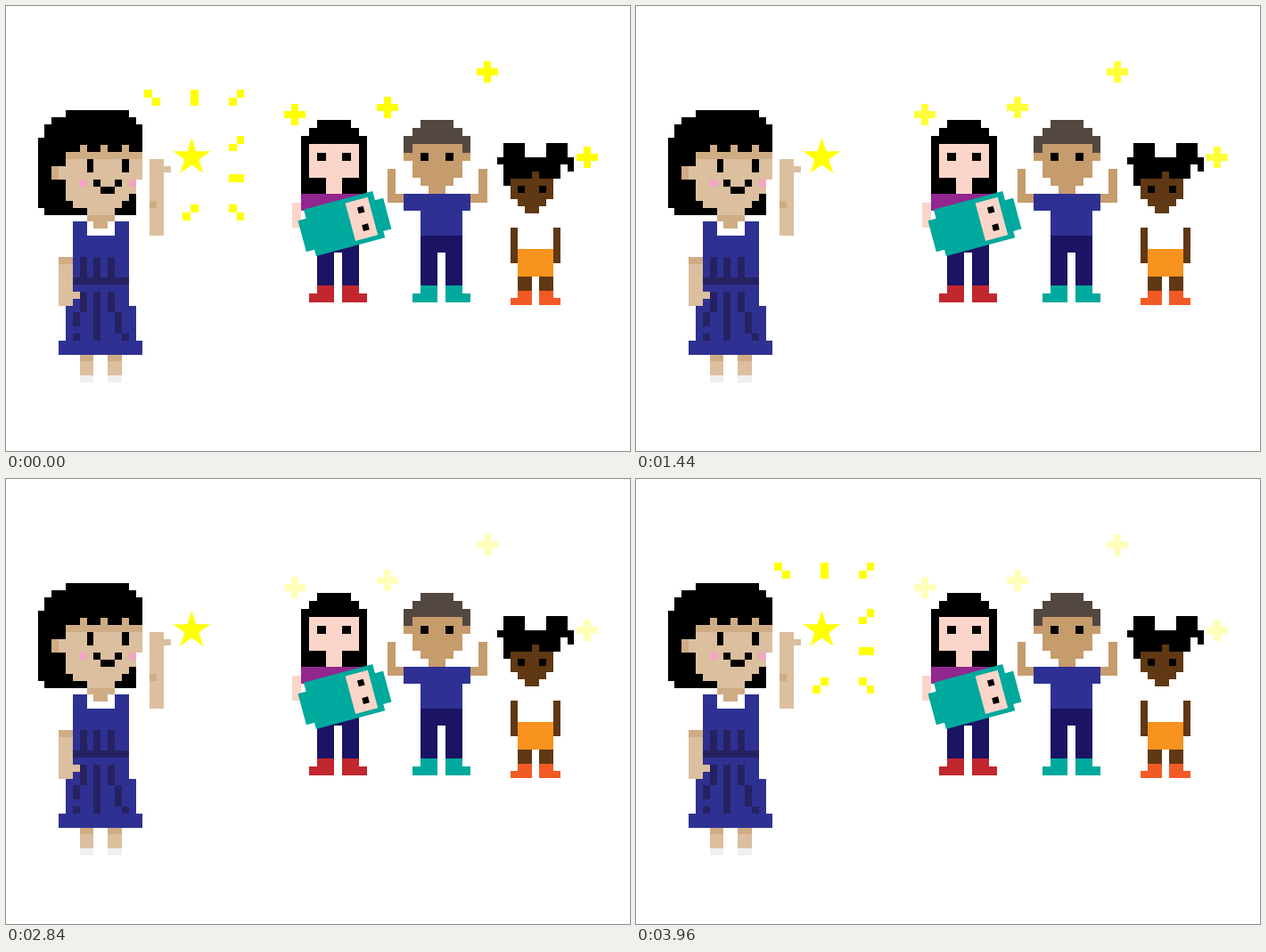
Animation of 700x500 px, one loop 4 s. Source, as an HTML page with a canvas:

```html
<!DOCTYPE html>
<html lang="en">
<head>
<meta charset="utf-8">
<title>Star pupils</title>
<style>
  html, body { margin: 0; width: 100%; height: 100%; overflow: hidden; background: #fff; }
  canvas { display: block; }
</style>
</head>
<body>
<canvas id="stage" width="700" height="500"></canvas>
<script>
const ctx = document.getElementById('stage').getContext('2d');
const LOOP = 4000;
const YELLOW = '#ffff00', BLACK = '#000', BLUE = '#2e3192', TEAL = '#00a99d';

// Pixel-art brush: all coordinates are cells of a grid placed at (x0, y0).
function grid(x0, y0, cell) {
  function box(color, c, r, w = 1, h = 1) {
    const x = Math.round(x0 + c * cell), y = Math.round(y0 + r * cell);
    ctx.fillStyle = color;
    ctx.fillRect(x, y, Math.round(x0 + (c + w) * cell) - x, Math.round(y0 + (r + h) * cell) - y);
  }
  // A box and its mirror image within a span of the given number of columns.
  function twin(color, span, c, r, w = 1, h = 1) {
    box(color, c, r, w, h);
    box(color, span - c - w, r, w, h);
  }
  // A box with stepped corners: each corner's inset shrinks as 1/distance from the edge.
  function blob(color, c, r, w, h, { tl = 0, tr = 0, bl = 0, br = 0 }) {
    for (let i = 0; i < h; i++) {
      const inset = (top, bottom) => Math.max(Math.floor(top / (i + 1)), Math.floor(bottom / (h - i)));
      const left = inset(tl, bl);
      box(color, c + left, r + i, w - left - inset(tr, br), 1);
    }
  }
  return { box, twin, blob };
}

function drawLegs({ twin }, left, top, length, color, shoes) {
  const span = 2 * left + 5, foot = top + length;
  twin(color, span, left, top, 2, length);
  twin(shoes, span, left, foot, 2);
  twin(shoes, span, left - 1, foot + 1, 3);
}

function drawTeacher() {
  const { box, twin, blob } = grid(35.6, 116.8, 7.85);
  const skin = '#dbbf9f', shade = '#cfac84', navy = '#262262';

  // Hair and face
  blob(BLACK, 0, 0, 15, 6, { tl: 4, tr: 2 });
  blob(BLACK, 0, 6, 14, 9, { bl: 1 });
  box(skin, 4, 6, 11, 4);
  blob(skin, 4, 6, 10, 8, { bl: 1, br: 2 });
  box(shade, 4, 6, 11);
  for (let c = 6; c <= 12; c += 3) box(shade, c, 5);
  box(skin, 2, 8, 2, 2);
  box(shade, 2, 8, 1, 2);
  twin(BLACK, 20, 7, 7, 1, 2);
  twin('#f2a5c5', 20, 6, 10);
  twin(BLACK, 20, 8, 10);
  box(BLACK, 9, 11, 2);

  // Dress
  box(BLUE, 5, 16, 8, 10);
  box(BLUE, 4, 26, 9, 2);
  box(BLUE, 4, 28, 10, 5);
  box(BLUE, 3, 33, 12, 2);
  box(navy, 5, 24, 8);
  for (let c = 6; c <= 10; c += 2) {
    box(navy, c, 21, 1, 3);
    box(navy, c, 26, 1, c === 8 ? 6 : 3);
  }
  box(navy, 5, 29, 1, 2);
  box(navy, 11, 29, 1, 3);
  for (const c of [5, 8, 12]) box(navy, c, 32);

  // Neck, collar, arms and legs
  box(skin, 7, 14, 4);
  box(shade, 7, 15, 4);
  box('#fff', 7, 16, 4, 2);
  box(shade, 8, 16, 2);
  box(skin, 3, 21, 2, 7);
  box(shade, 3, 21, 2);
  box(skin, 5, 26);
  box(skin, 16, 7, 2, 11);
  box(skin, 18, 8);
  box(shade, 16, 13);
  twin(skin, 18, 6, 35, 2, 3);
  twin(shade, 18, 6, 35, 2);
  twin('#f0f0f0', 18, 6, 38, 2);
}

function drawStar() {
  ctx.fillStyle = YELLOW;
  ctx.beginPath();
  for (let i = 0; i < 10; i++) {
    const a = i * Math.PI / 5, r = i % 2 ? 8.4 : 22;
    ctx.lineTo(208.4 + r * Math.sin(a), 170 - r * Math.cos(a));
  }
  ctx.fill();
}

// Each ray is a cell and its neighbour in the given direction.
function drawRays() {
  const { box } = grid(155.4, 94.4, 8.6);
  const ray = (c, r, dc, dr) => { box(YELLOW, c, r); box(YELLOW, c + dc, r + dr); };
  for (let i = 0; i < 3; i++) ray(6 * i, 0, 1 - i, 1);
  ray(12, 6, -1, 1);
  ray(11, 11, 1, 0);
  ray(6, 15, -1, 1);
  ray(11, 15, 1, 1);
}

function drawCard(x, y) {
  const box = (color, cx, cy, w, h) => {
    ctx.fillStyle = color;
    ctx.fillRect(cx - w / 2, cy - h / 2, w, h);
  };
  ctx.save();
  ctx.translate(x, y);
  ctx.rotate(-Math.PI / 12);
  box(TEAL, 0, 0, 80, 54);
  box(TEAL, 0, 1.5, 99, 36);
  box('#fbd5c9', 20, 0, 26, 44);
  for (const side of [-1, 1]) box(BLACK, 22, side * 10.2, 7, 7);
  ctx.restore();
}

function drawWoman(lift) {
  const g = grid(330.7, 127.5 - lift, 9.33), skin = '#fbd5c9';
  g.blob(BLACK, 0, 0, 8, 9, { tl: 2, tr: 2 });
  g.box(skin, 1, 3, 6, 4);
  g.box(skin, 3, 7, 2, 2);
  g.twin(BLACK, 8, 2, 4);
  g.box(skin, -1, 10, 1, 3);
  g.box('#92278f', 0, 9, 8, 2);
  g.box('#1b1464', 2, 14, 5, 2);
  drawLegs(g, 2, 16, 4, '#1b1464', '#c1272d');
  drawCard(379.6, 244.5 - lift);
}

function drawMan() {
  const g = grid(446.2, 127.5, 9.33), skin = '#c69c6d';
  g.blob('#534741', 0, 0, 8, 4, { tl: 2, tr: 2 });
  g.blob(skin, 1, 3, 6, 6, { bl: 2, br: 2 });
  g.box(skin, 0, 4, 8);
  g.twin(BLACK, 8, 2, 4);
  g.twin(skin, 8, -2, 6, 1, 4);
  g.twin(skin, 8, -1, 9);
  g.box(BLUE, 0, 9, 8, 2);
  g.box(BLUE, 2, 11, 5, 3);
  g.box('#1b1464', 2, 14, 5, 2);
  drawLegs(g, 2, 16, 4, '#1b1464', TEAL);
}

function drawChild(lift) {
  const g = grid(550.5, 154.2 - lift, 7.9), skin = '#603813';
  g.twin(BLACK, 11, 1, 0, 3, 2);
  g.box(BLACK, 0, 2, 11);
  g.box(BLACK, 10, 3);
  g.box(BLACK, 1, 3, 8, 2);
  g.box(BLACK, 1, 5);
  g.box(skin, 5, 4);
  g.blob(skin, 2, 5, 6, 5, { bl: 2, br: 2 });
  g.twin(BLACK, 10, 3, 6);
  g.twin(skin, 11, 2, 12, 1, 5);
  g.box('#f7931e', 3, 15, 5, 4);
  drawLegs(g, 3, 19, 2, skin, '#f15a24');
}

function drawSparkles(alpha) {
  ctx.globalAlpha = alpha;
  for (const [x, y] of [[312, 110], [416, 102], [528, 62], [640, 158]]) {
    const { box, twin } = grid(x, y, 8);
    box(YELLOW, 1, 0, 1, 3);
    twin(YELLOW, 3, 0, 1);
  }
  ctx.globalAlpha = 1;
}

const smooth = a => a * a * (3 - 2 * a);
const arc = (p, height) => p > 0 && p < 1 ? 4 * height * p * (1 - p) : 0;

// A jump followed by one small rebound, repeated after a rest.
function jump(t, start, duration, height, rebound) {
  if (t < start) return 0;
  const s = (t - start) % 1160;
  return Math.round(arc(s / duration, height) + arc((s - duration) / rebound, height * 0.28));
}

function draw(t) {
  ctx.fillStyle = '#fff';
  ctx.fillRect(0, 0, 700, 500);
  drawTeacher();
  drawStar();
  if (Math.floor(t / 375) % 2 === 0) drawRays();
  drawMan();
  drawWoman(jump(t, 800, 458, 34.5, 170));
  drawChild(jump(t, 535, 365, 29, 200));
  drawSparkles(smooth(Math.abs(1 - t / 850 % 2)));
}

const begin = performance.now();
function tick() {
  draw((performance.now() - begin) % LOOP);
  requestAnimationFrame(tick);
}
tick();
</script>
</body>
</html>
```
